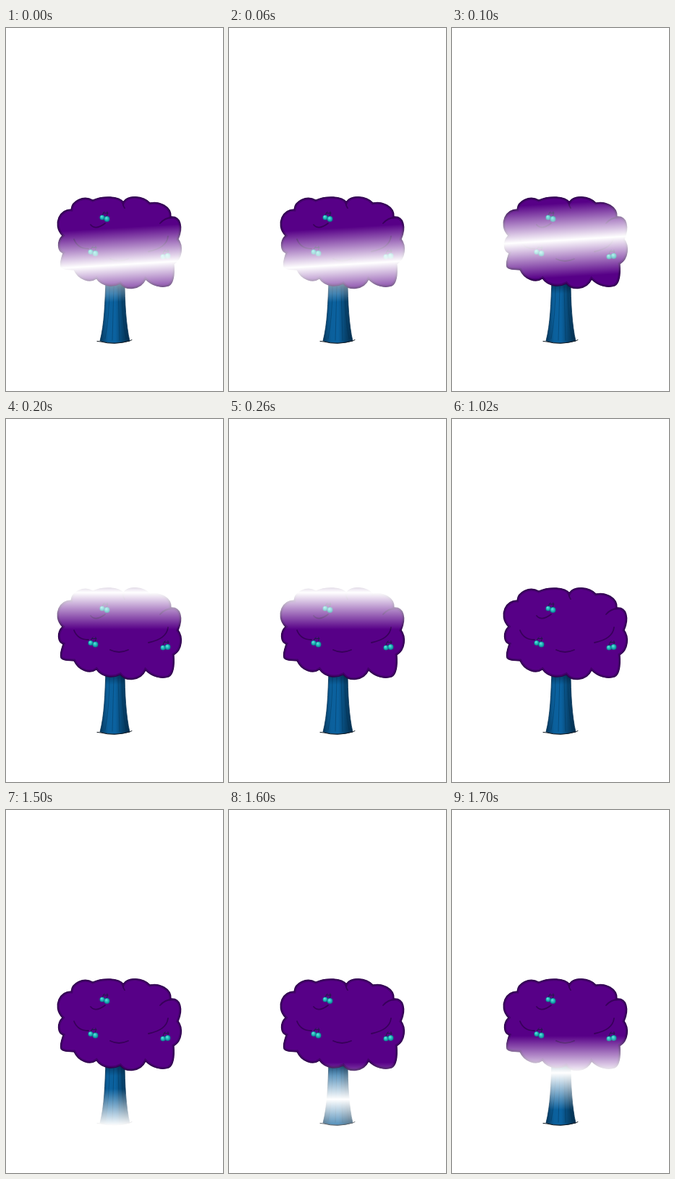
Write an HTML page with a canvas that moves like this. It is 300x500 px and loops after 1800 ms.

```html
<!DOCTYPE html>
<html lang="en">
<head>
<meta charset="utf-8">
<title>Shining tree</title>
<style>
  html, body { margin: 0; width: 100%; height: 100%; overflow: hidden; background: #fff; }
  canvas { display: block; }
</style>
</head>
<body>
<canvas width="300" height="500"></canvas>
<script>
const LOOP = 1800, REACH = 51;
const stage = document.querySelector('canvas').getContext('2d');
const tree = document.createElement('canvas');
tree.width = 300;
tree.height = 500;
const ctx = tree.getContext('2d');

const crown = new Path2D(`M90 250 C91 238 107 230 120 237 C133 231 157 231 162 240
  C168 229 190 231 199 241 C212 238 229 246 228 260 C242 259 245 275 238 291
  C245 300 244 318 232 325 C233 338 232 351 225 355 C214 359 201 354 193 346
  C186 361 166 362 158 352 C147 358 132 355 125 345 C117 351 101 348 94 333
  C88 332 80 334 76 329 C74 324 77 316 79 310 C71 307 70 294 78 286
  C70 278 70 268 73 261 C77 253 84 250 90 250 Z`);
const trunk = new Path2D(`M138 346 C137 378 136 408 130 431 Q149 437 171 431
  C166 410 164 378 164 346 Z`);
const folds = new Path2D(`M117 271 Q124 279 137 269 M94 291 Q99 304 114 304
  M144 318 Q156 324 169 318 M224 287 Q222 303 197 308 M213 269 Q220 261 230 261
  M162 239 Q161 244 164 248`);
const grain = new Path2D('M143 356 Q143 398 137 428 M149 356 L147 430 M155 356 L157 430 M160 356 Q160 398 166 428');

function stroke(path, color, width) {
  ctx.strokeStyle = color;
  ctx.lineWidth = width;
  ctx.stroke(path);
}

function gradient(x0, y0, x1, y1, ...colors) {
  const g = ctx.createLinearGradient(x0, y0, x1, y1);
  colors.forEach((c, i) => g.addColorStop(i / (colors.length - 1), c));
  return g;
}

function berry(x, y, r) {
  const g = ctx.createRadialGradient(x - 1, y - 1.5, 0.3, x, y, r);
  g.addColorStop(0, '#62e2dc');
  g.addColorStop(0.55, '#20b5b8');
  g.addColorStop(1, '#08788a');
  ctx.fillStyle = g;
  ctx.beginPath();
  ctx.arc(x, y, r, 0, 7);
  ctx.fill();
}

function cherries(x, y, drop) {
  const stems = new Path2D(`M${x - 3} ${y - 3} Q${x - 2} ${y - 8} ${x} ${y - 9}
    M${x + 3} ${y - 2} Q${x + 5} ${y - 6} ${x + 4} ${y - 9} M${x - 1} ${y - 7} h6`);
  stroke(stems, '#211849', 1);
  berry(x - 3, y - drop, 3.6);
  berry(x + 3.5, y + drop, 4);
}

function drawTree() {
  ctx.fillStyle = gradient(131, 0, 171, 0, '#07395e', '#0b609c', '#0b62a0', '#07446f', '#042c4a');
  ctx.fill(trunk);
  stroke(grain, 'rgba(2,40,70,.35)', 1);
  ctx.fillStyle = gradient(0, 350, 0, 366, 'rgba(0,18,40,.55)', 'rgba(0,18,40,0)');
  ctx.fill(trunk);
  stroke(trunk, '#063253', 0.8);
  stroke(new Path2D('M126 431.5 L131 432 Q149 437 171 431 L174 429.5'), '#101820', 1);

  ctx.fillStyle = '#570087';
  ctx.fill(crown);
  ctx.save();
  ctx.clip(crown);
  stroke(crown, '#43006b', 5);
  ctx.restore();
  stroke(crown, '#2d004b', 1.3);
  ctx.lineCap = 'round';
  stroke(folds, '#38005b', 1.8);
  cherries(136, 262, 1);
  cherries(120, 309.5, 1);
  cherries(220, 314.5, -0.5);
}

// Height of the light band at the middle of the tree, and its tilt
function band(t) {
  const step = Math.floor(t / 100);
  if (step >= 15) return [435 - 36.5 * (step - 15), 0];
  return [[326, -0.06], [292, -0.06], [239, 0]][step];
}

function shine([y, tilt]) {
  ctx.save();
  ctx.globalCompositeOperation = 'source-atop';
  ctx.transform(1, tilt, 0, 1, 157, y);
  const clear = 'rgba(255,255,255,0)';
  ctx.fillStyle = gradient(0, -REACH, 0, REACH, clear, '#fff', clear);
  ctx.fillRect(-157, -REACH, 300, 2 * REACH);
  ctx.restore();
}

function frame() {
  const t = performance.now() % LOOP;
  ctx.clearRect(0, 0, 300, 500);
  drawTree();
  if (t < 300 || t >= 1500) shine(band(t));
  stage.clearRect(0, 0, 300, 500);
  stage.drawImage(tree, 0, 0);
  requestAnimationFrame(frame);
}
frame();
</script>
</body>
</html>
```
